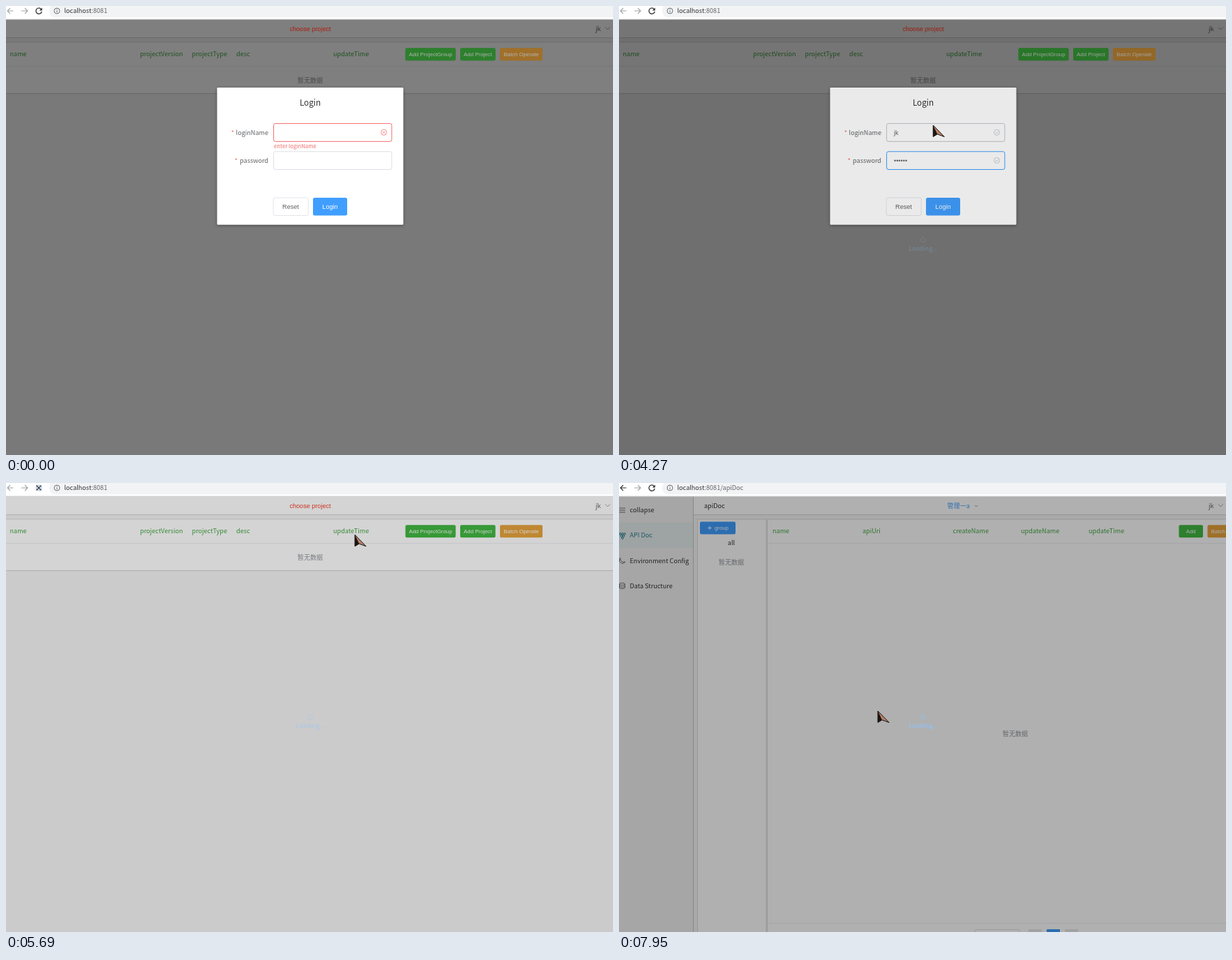
These frames come from a looping animation (870x644 px, 8 s). An HTML page:

```html
<!DOCTYPE html>
<html lang="en">
<head>
<meta charset="utf-8">
<title>Login and open project</title>
<style>
html, body { margin: 0; width: 100%; height: 100%; overflow: hidden; background: #fff; }
svg { display: block; }
text { font: 9.1px "Noto Sans CJK SC", "Noto Sans", sans-serif; fill: #606266; white-space: pre; }
.ui { font-family: "Liberation Sans", Arial, sans-serif; }
.sm { font-size: 7.8px; }
.th { fill: #43a643; }
.dim { fill: #909399; }
.line { fill: none; stroke: #606266; stroke-width: .9; }
</style>
</head>
<body>
<svg id="stage" width="870" height="644" viewBox="0 0 870 644"></svg>
<script>
const GREEN = '#41b841', ORANGE = '#e6a23c', BLUE = '#409eff', RED = '#f56c6c';
const USER = 'jk', LOOP = 8000;

const text = (x, y, s, attrs = '') => `<text x="${x}" y="${y}" ${attrs}>${s}</text>`;
const mid = (x, y, s, attrs = '') => text(x, y, s, `text-anchor="middle" ${attrs}`);
const rect = (x, y, w, h, fill, attrs = '') =>
  `<rect x="${x}" y="${y}" width="${w}" height="${h}" fill="${fill}" ${attrs}/>`;
const path = (d, attrs = '') => `<path d="${d}" class="line" ${attrs}/>`;
const group = (id, body, attrs = '') => `<g id="${id}" ${attrs}>${body}</g>`;
const rule = (x, y, w, color = '#ebeef5') => rect(x, y, w, 1, color);
const heads = list => list.map(([x, s]) => text(x, 72, s, 'class="th"')).join('');

function button(x, y, w, label, fill, plain) {
  return rect(x, y, w, 18, fill, `rx="2" ${plain ? 'stroke="#dcdfe6" stroke-width=".7"' : ''}`) +
    mid(x + w / 2, y + 11.8, label, `class="ui sm" style="fill:${plain ? '#606266' : '#fff'}"`);
}

const userMenu = text(845, 36, USER) + path('M859 30.5l3.3 3.3 3.3-3.3', 'style="stroke:#909399"');

function chrome() {
  return rect(0, 0, 870, 19, '#fff') + rect(62, -3, 830, 19.3, '#f1f3f4', 'rx="9"') +
    rule(0, 18.6, 870, '#d0d0d0') +
    path('M10.5 7H2M6 3L2 7l4 4', 'id="back" style="stroke-width:1.1"') +
    path('M22 7h8.500M27 3l4 4-4 4', 'style="stroke:#a0a3a6;stroke-width:1.1"') +
    group('reload', path('M50.500 4.600A4.200 4.200 0 1 0 51.200 8', 'style="stroke:#333;stroke-width:1.3"') +
      '<path d="M51.800 2.500v4h-4z" fill="#333"/>') +
    group('stop', path('M43.500 3.500l7 7m0-7l-7 7', 'style="stroke:#33435c;stroke-width:1.500"') +
      path('M43.500 3.500h7v7h-7z', 'style="stroke:#8a97ab;stroke-width:.7"')) +
    '<circle cx="73" cy="7" r="4" class="line"/>' + path('M73 6.300v3M73 4.400v1') +
    text(83.5, 10, '<tspan fill="#303133">localhost</tspan>:8081<tspan id="route"></tspan>');
}

const folder = y => path(`M6 ${y - 3}h3l1 1.200h4v5.300h-8z`, 'style="stroke-width:.8"');

// [name, row bottom, time, is folder, version, type, desc]
const ROWS = [
  ['管理员的分组11a', 117, '2020-01-03 16:29:29', 1],
  ['group 1', 148, '2020-01-03 12:52:00', 1],
  ['group11', 179, '2020-01-03 14:48:20', 1],
  ['group12', 210, '2020-01-03 14:49:23', 1],
  ['TEST1.3.1', 241, '2020-02-11 12:51:09', 1],
  ['西城', 276, '2019-12-06 10:42:13', 0, '', 'app', ''],
  ['昆仑', 310, '2019-12-06 10:40:52', 0, '', 'web', ''],
  ['管理一a', 342, '2020-01-03 16:29:58', 0, '1.0', 'pc', 'testa']
];

function row([name, bottom, time, isFolder, version, type, desc], i) {
  const top = i ? ROWS[i - 1][1] : 86, y = (top + bottom) / 2 + .2;
  let out = text(isFolder ? 21 : 5.5, y + 3.2, name) + text(469, y + 3.2, time) +
    rule(0, bottom, 870, i < 7 ? '#ebeef5' : '#d4d4d4');
  if (isFolder) return out + folder(y);
  out += text(192, y + 3.2, version) + text(266.5, y + 3.2, type) + text(330, y + 3.2, desc);
  if (!version) out += button(572.7, y - 9, 26.3, 'Auth', '#fff', true) +
    button(605.7, y - 9, 23, 'Edit', '#fff', true) + button(635.5, y - 9, 33, 'Delete', RED);
  return out;
}

function listPage() {
  const accents = mid(436, 35.5, 'choose project', 'class="ui" style="fill:#f4402c"') +
    button(572.5, 60.2, 72, 'Add ProjectGroup', GREEN) +
    button(651, 60.2, 50.5, 'Add Project', GREEN) + button(708, 60.2, 61, 'Batch Operate', ORANGE);
  return rect(0, 19, 870, 625, '#f4f4f4') + rect(0, 19, 870, 26, '#fff') + rule(0, 45, 870, '#d4d4d4') +
    rule(0, 51.5, 870, '#d9d9d9') + rect(0, 52.5, 870, 34, '#fff') + userMenu +
    heads([[5.5, 'name'], [192, 'projectVersion'], [266.5, 'projectType'], [330, 'desc'], [469, 'updateTime']]) +
    group('accents', accents) +
    group('empty', rect(0, 86, 870, 39.5, '#fff') + mid(436, 109.5, '暂无数据', 'class="dim"') +
      rule(0, 125.2, 870, '#cfcfcf')) +
    group('rows', rect(0, 86, 870, 256, '#fff') + rect(0, 311, 870, 31, '#fafafa', 'id="hover"') +
      ROWS.map(row).join('')) + rule(0, 86, 870);
}

function docPage() {
  const items = ['collapse', 'API Doc', 'Environment Config', 'Data Structure'];
  const teal = 'style="stroke:#2b7f93"';
  const grapes = [[2, 73], [5, 73], [8, 73], [3.5, 76], [6.5, 76], [5, 79]]
    .map(([x, y]) => `<circle cx="${x}" cy="${y}" r="1.400" class="line" ${teal}/>`).join('');
  return rect(0, 19, 870, 625, '#f4f4f4') +
    rect(0, 19, 106, 625, '#f0f0f0') + rect(0, 57, 106, 36, '#e5ecec') + rect(106, 19, 1, 625, '#c4c4c4') +
    items.map((s, i) => text(15.5, 42 + i * 36.3, s, `style="fill:${i == 1 ? '#2b7f93' : '#303133'}"`)).join('') +
    path('M.5 36h8.500M.5 39h8.500M.5 42h8.500') + grapes +
    path('M2 107.500a4.500 4.500 0 1 0 7 5.500a5 5 0 0 1-7-5.500z') +
    path('M.5 145a4 1.600 0 0 1 8 0v5a4 1.600 0 0 1-8 0za4 1.600 0 0 0 8 0M.5 147.700a4 1.600 0 0 0 8 0') +
    rect(107, 19, 763, 26, '#fff') + rule(107, 45, 763, '#d4d4d4') +
    text(122, 35.5, 'apiDoc', 'style="fill:#303133"') +
    text(470.5, 35.5, '管理一a', `style="fill:${BLUE}"`) +
    path('M510 32l2 2 2-2', 'style="stroke:#909399"') + userMenu +
    rect(112.5, 52, 98.5, 600, '#fff', 'stroke="#dcdcdc"') +
    rect(116, 55.5, 51, 18, BLUE, 'rx="2"') + path('M127 64.500h6m-3-3v6', 'style="stroke:#fff"') +
    text(137, 67.3, 'group', 'class="ui sm" style="fill:#fff"') +
    mid(161, 89, 'all', 'style="fill:#303133"') + mid(161, 116.5, '暂无数据', 'class="dim"') +
    rect(212.5, 52, 670, 600, '#fff', 'stroke="#dcdcdc"') +
    heads([[220, 'name'], [349, 'apiUri'], [478.5, 'createName'], [576, 'updateName'], [673, 'updateTime']]) +
    button(802.5, 60.2, 34.5, 'Add', GREEN) + button(843.5, 60.2, 61, 'Batch Operate', ORANGE) +
    rule(213, 86, 657) + mid(568, 362.7, '暂无数据', 'class="dim"') + rule(213, 631, 657) +
    rect(510, 640.5, 64, 18, '#fff', 'stroke="#dcdfe6" rx="2"') +
    [587, 613, 639].map((x, i) => rect(x, 640, 19, 18, i == 1 ? BLUE : '#e9e9eb', 'rx="1"')).join('');
}

function field(id, label, y, starX) {
  return text(376, y + 3.5, label, 'text-anchor="end"') +
    text(starX, y + 3.5, '*', `text-anchor="end" style="fill:${RED}"`) +
    rect(383.6, y - 12.7, 169.3, 25.7, '#fff', `id="${id}Box" rx="2.500" stroke-width="1"`) +
    text(394, y + 3.2, '', `id="${id}Text" class="ui"`) +
    group(id + 'Ok', `<circle cx="541.500" cy="${y}" r="4" class="line"/>` +
      path(`M539.500 ${y}l1.600 1.500 2.500-2.800`), 'style="--c:#c0c4cc"');
}

function dialog() {
  return rect(302.5, 117, 267, 196.7, '#fff', 'rx="1.300" style="filter:drop-shadow(0 1px 2px #0006)"') +
    mid(436, 142.7, 'Login', 'style="font-size:11.7px;fill:#303133"') +
    field('name', 'loginName', 181.3, 327) + field('pass', 'password', 221.5, 332) +
    group('bad', `<g stroke="${RED}" stroke-width=".8" fill="none"><circle cx="541.500" cy="181.300" r="4"/>` +
      '<path d="M540 179.800l3 3m0-3l-3 3"/></g>' +
      text(384, 204, 'enter loginName', `class="sm" style="fill:${RED}"`)) +
    rect(0, 0, .8, 11, '#303133', 'id="caret"') +
    rect(383.2, 275, 50, 25.5, '#fff', 'rx="2.500" stroke="#dcdfe6" stroke-width=".8"') +
    mid(408, 291, 'Reset', 'class="ui"') + rect(440, 275, 49, 25.5, BLUE, 'rx="2.500"') +
    mid(464.5, 291, 'Login', 'class="ui" style="fill:#fff"');
}

function loading() {
  let spokes = '';
  for (let i = 0; i < 8; i++) spokes += `<path d="M0-2.400V-4.500" transform="rotate(${i * 45})"/>`;
  return `<g transform="translate(435.800 335.700)" stroke="#8cc4ff" stroke-width=".9">${spokes}</g>` +
    mid(436, 350.5, 'Loading...', 'style="fill:#8cc4ff"');
}

function cursors() {
  return group('beam', '<path d="M-2-6h1.500l.5.700.5-.7H2M0-5.500v11M-2 6h1.500l.5-.7.5.7H2" fill="none" stroke="#111" stroke-width="1.200"/>') +
    group('arrow', '<path d="M0 0V16.500L6 12.800 16 16.500Z" fill="#b98468" stroke="#111" stroke-width="1"/>' +
      '<path d="M0 0V16.500L6 12.800Z" fill="#1c1414"/>') +
    group('hand', '<path d="M-1 1q1.500-2 3.200 0l1.200 5.500 6.500 1.500q2 1 1.200 4l-1.200 7H3l-6-7q-1-2.500 1.200-2l2 1.200z" fill="#c9b8b0" stroke="#222" stroke-width=".9"/>' +
      '<path d="M2 10l7-1 .500 7-5 1.500z" fill="#6b2222"/>');
}

const dark = id => rect(0, 19, 870, 625, '#000', `id="${id}"`);
const stage = document.getElementById('stage');
stage.innerHTML = group('list', listPage()) + group('doc', docPage()) + dark('modal') +
  '<use id="glow" href="#accents"/>' + group('dialog', dialog()) + dark('shade') +
  group('loading', loading()) + chrome() + group('cursor', cursors());

const $ = id => document.getElementById(id);
const show = (id, on) => $(id).style.display = on ? '' : 'none';
const fade = (id, a) => $(id).setAttribute('opacity', a);
const ramp = (t, start, length) => Math.min(1, Math.max(0, (t - start) / length));
const count = (t, times) => times.filter(k => t >= k).length;

$('nameOk').querySelectorAll('.line').forEach(e => e.style.stroke = '#c0c4cc');
$('passOk').querySelectorAll('.line').forEach(e => e.style.stroke = '#c0c4cc');

// time, x, y
const POINTER = [
  [70, 692, 504], [300, 560, 320], [520, 402, 186], [680, 446, 171], [830, 449.5, 170],
  [4190, 449.5, 170], [4350, 451, 172], [4600, 451, 172], [4830, 449, 130], [5130, 202, 124],
  [5370, 448, 109], [5530, 490, 86], [5690, 500, 74], [6310, 540, 262], [6540, 313, 341],
  [7160, 313, 341], [7320, 313, 341], [7800, 371, 327], [LOOP, 371, 327]
];

function pointer(t) {
  const i = POINTER.findIndex(p => p[0] > t);
  if (i < 1) return POINTER[0].slice(1);
  const [t0, x0, y0] = POINTER[i - 1], [t1, x1, y1] = POINTER[i], k = (t - t0) / (t1 - t0);
  return [x0 + (x1 - x0) * k, y0 + (y1 - y0) * k];
}

function draw(t) {
  const onDoc = t >= 7320, loaded = t >= 5850, busy = t >= 4400 && !loaded;
  const leave = ramp(t, 4450, 320), valid = ramp(t, 2780, 200);
  const inPassword = t >= 2780;

  show('list', !onDoc);
  show('doc', onDoc);
  show('empty', !loaded);
  show('rows', loaded);
  show('hover', t >= 6500);
  show('reload', !busy);
  show('stop', busy);
  $('route').textContent = onDoc ? '/apiDoc' : '';
  $('back').style.stroke = onDoc ? '#333' : '#a0a3a6';

  fade('modal', .5 * (1 - leave));
  fade('glow', onDoc ? 0 : .4 * (1 - leave));
  fade('dialog', Math.max(0, 1 - 1.25 * leave));
  $('dialog').setAttribute('transform', `translate(0 ${-13 * leave})`);

  const load = onDoc ? ramp(t, 7400, 300) : ramp(t, 4190, 300) * (1 - ramp(t, 5530, 350));
  fade('shade', .31 * load);
  fade('loading', load);

  const typed = count(t, [1920, 2540]);
  const dots = count(t, [3010, 3170, 3330, 3570, 3720, 3880]);
  $('nameText').textContent = USER.slice(0, typed);
  $('passText').textContent = '•'.repeat(dots);
  $('nameBox').setAttribute('stroke', valid < .5 ? RED : '#c0c4cc');
  $('passBox').setAttribute('stroke', inPassword ? BLUE : '#dcdfe6');
  fade('bad', 1 - valid);
  fade('nameOk', valid);
  show('passOk', t >= 4190);

  show('caret', (t >= 830 && t < 1380) || (t >= 1920 && t < 4190));
  $('caret').setAttribute('x', 394 + (inPassword ? dots * 3.19 : [0, 2, 6.6][typed]));
  $('caret').setAttribute('y', inPassword ? 216 : 176);

  const beam = t >= 640 && t < 4270, hand = t >= 5900 && !onDoc;
  show('cursor', t >= 70);
  show('beam', beam);
  show('hand', hand);
  show('arrow', !beam && !hand);
  $('cursor').setAttribute('transform', `translate(${pointer(t)})`);
}

const start = performance.now();
function tick() {
  draw((performance.now() - start) % LOOP);
  requestAnimationFrame(tick);
}
tick();
</script>
</body>
</html>
```
